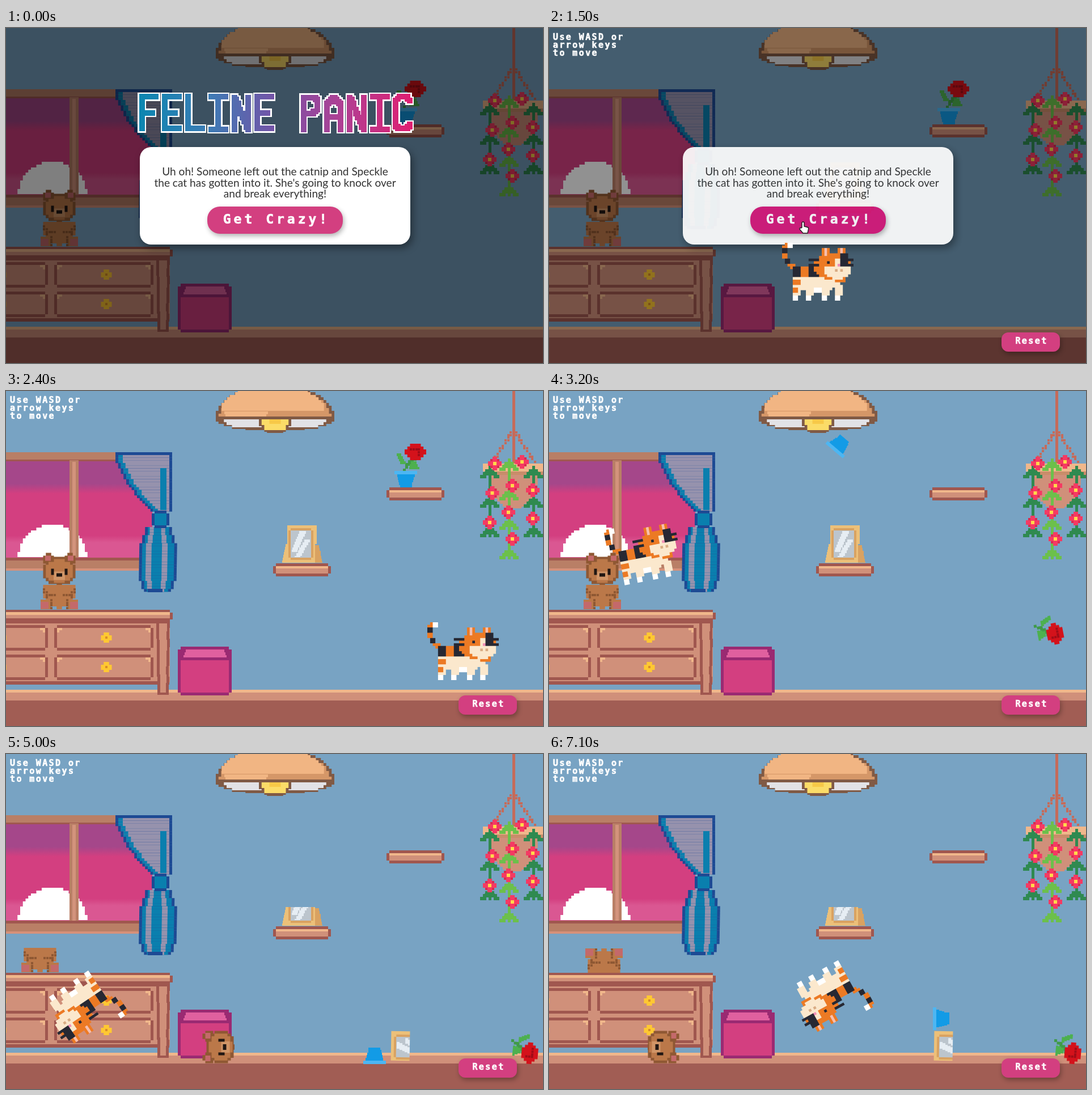
Animation, 947 px wide and 591 px high, one loop 7200 ms. Source, as an HTML page with a canvas:

```html
<!DOCTYPE html>
<html lang="en">
<head>
<meta charset="utf-8">
<title>Feline Panic</title>
<style>
html, body { margin: 0; width: 947px; height: 591px; overflow: hidden; }
body { position: relative; background: #78a3c3; }
canvas, div, svg { position: absolute; }
canvas { left: 0; top: 0; }
.pixel { font: bold 15px/14px "DejaVu Sans Mono", monospace; letter-spacing: 2.4px; color: #fff; white-space: pre; -webkit-text-stroke: .6px #fff; }
#shade { inset: 0; background: rgba(0, 0, 0, .5); }
#card { left: 236px; top: 210px; width: 477px; height: 172px; border-radius: 20px; background: #fff; box-shadow: 4px 6px 14px rgba(0, 0, 0, .4); }
#story { left: 0; right: 0; top: 33px; text-align: center; white-space: nowrap; font: 19.1px/19.5px Lato, sans-serif; color: #333; }
.button { background: #d33f80; box-shadow: 2px 4px 8px rgba(0, 0, 0, .3); text-align: center; }
#go { left: 119px; top: 105px; width: 239px; height: 48px; border-radius: 22px; font-size: 23px; line-height: 44px; letter-spacing: 5px; text-indent: 5px; }
#reset { left: 798px; top: 537px; width: 103px; height: 34px; border-radius: 12px; line-height: 31px; text-indent: 3px; }
#hint { left: 7px; top: 9px; }
</style>
</head>
<body>
<canvas id="room" width="947" height="591"></canvas>
<div id="shade"></div>
<canvas id="title" width="947" height="591" role="img" aria-label="FELINE PANIC"></canvas>
<div id="card">
  <div id="story">Uh oh! Someone left out the catnip and Speckle<br>the cat has gotten into it. She's going to knock over<br>and break everything!</div>
  <div id="go" class="button pixel">Get Crazy!</div>
</div>
<canvas id="actor" width="947" height="591"></canvas>
<div id="game">
  <div id="hint" class="pixel">Use WASD or
arrow keys
to move</div>
  <div id="reset" class="button pixel">Reset</div>
</div>
<svg id="hand" width="20" height="24"><path d="M6 11V3a2 2 0 0 1 4 0v6l6 1.5q2 .6 1.6 3L16 21H8L2 14q-.5-3 2-2z" fill="#fff" stroke="#222" stroke-width="1.4"/></svg>
<script>
const $ = id => document.getElementById(id);
const W = 947, H = 591, LOOP = 7200, CLICK = 1400, PIXEL = 4.75, GRAVITY = .0012;
const EDGE = '#a0574f', WOOD = '#d0907a', LIGHT = '#f0b78b', FRAME = '#b97f66';
const roomCtx = $('room').getContext('2d'), actorCtx = $('actor').getContext('2d');
let g;

function box(color, x, y, w, h) {
  g.fillStyle = color;
  g.fillRect(x, y, w, h);
}

// Bordered block with notched corners.
function block(edge, fill, x, y, w, h, b = 5) {
  box(edge, x + b, y, w - 2 * b, h);
  box(edge, x, y + b, w, h - 2 * b);
  box(fill, x + b, y + b, w - 2 * b, h - 2 * b);
}

// Stepped ellipse, optionally cut between two heights.
function blob(color, cx, cy, rx, ry, top = cy - ry, bottom = cy + ry, p = PIXEL) {
  for (let y = top; y < bottom - p / 4; y += p) {
    const k = (y + p / 2 - cy) / ry;
    const half = Math.round(rx * Math.sqrt(Math.max(0, 1 - k * k)) / p) * p;
    const y1 = Math.round(y), y2 = Math.round(Math.min(bottom, y + p));
    box(color, cx - half, y1, half * 2, y2 - y1);
  }
}

// Stepped trapezoid from one width to another around a sliding centre.
function taper(color, y, y2, cx, w, cx2 = cx, w2 = w) {
  for (let t = y; t < y2 - 1; t += PIXEL) {
    const u = (t + PIXEL / 2 - y) / (y2 - y);
    const half = (w + (w2 - w) * u) / 2, mid = cx + (cx2 - cx) * u;
    const y1 = Math.round(t), end = Math.round(Math.min(y2, t + PIXEL));
    box(color, Math.round(mid - half), y1, Math.round(half * 2), end - y1);
  }
}

// Squares stamped along a path, snapped to the pixel grid.
function trace(color, pts, size = 5, p = PIXEL) {
  const [x0, y0] = pts, snap = (v, v0) => Math.round(v0 + Math.round((v - v0) / p) * p - size / 2);
  for (let i = 0; i + 3 < pts.length; i += 2) {
    const [x, y, x2, y2] = pts.slice(i, i + 4), n = Math.ceil(Math.hypot(x2 - x, y2 - y) / 2);
    for (let k = 0; k <= n; k++)
      box(color, snap(x + (x2 - x) * k / n, x0), snap(y + (y2 - y) * k / n, y0), size, size);
  }
}

function sprite(x, y, w, h, draw) {
  const c = document.createElement('canvas');
  c.width = w;
  c.height = h;
  g = c.getContext('2d');
  g.translate(-x, -y);
  draw();
  return c;
}

function drawWindow() {
  const sky = g.createLinearGradient(0, 122, 0, 295);
  sky.addColorStop(.24, '#a5478a');
  sky.addColorStop(.34, '#d33f80');
  sky.addColorStop(.77, '#d33f80');
  sky.addColorStop(.84, '#da5792');
  box(sky, 0, 122, 258, 173);
  blob('#fff', 82, 293, 60, 57, 236, 293);
  box(FRAME, 0, 108, 235, 14);
  box(EDGE, 0, 121, 198, 3);
  box(FRAME, 112, 122, 16, 177);
  box('#d3937c', 117, 125, 6, 172);
  box(EDGE, 0, 294, 235, 5);
  box(FRAME, 0, 299, 235, 14);
  box('#d6917a', 0, 313, 235, 4);
}

function drawCurtain() {
  const edge = '#1d4a94', blue = '#0a7fae', grey = '#9692ad', right = 293;
  for (let y = 108; y < 212; y += PIXEL) {
    const left = 193 + Math.round(67 * ((y - 108) / 104) ** 1.7 / PIXEL) * PIXEL;
    box(edge, left, y, right - left, 5);
    box(grey, left + 5, y, right - left - 10, 5);
    box(blue, left + 5, y, 8, 5);
  }
  box(edge, 193, 108, 100, 5);
  box(blue, 272, 136, 11, 74);
  for (let y = 240; y < 350; y += PIXEL) {
    const u = (y - 240) / 114, cx = 269 - 2 * u;
    const half = Math.round(35 * Math.sin(.6 + 1.9 * u) ** .8 / PIXEL) * PIXEL;
    box(edge, cx - half, y, half * 2, 5);
    box(blue, cx - half + 5, y, half * 2 - 10, 5);
    box(grey, cx - half * .65, y, half * .3, 5);
    box(grey, cx + half * .2, y, half * .3, 5);
  }
  box(edge, 250, 349, 26, 6);
  block(edge, blue, 257, 211, 31, 31);
}

function drawDresser() {
  box(WOOD, 0, 404, 289, 110);
  box(EDGE, 0, 404, 289, 6);
  box(EDGE, 0, 512, 270, 6);
  for (const y of [413, 465]) for (const x of [-101, 85]) {
    block(EDGE, WOOD, x, y, 175, 45);
    for (const [cx, dx] of [[x + 5, 0], [x + 161, 5]]) {
      box(LIGHT, cx, y + 5, 9, 4);
      box(LIGHT, cx + dx, y + 9, 4, 4);
    }
    blob('#ffc832', x + 92, y + 22, 9, 9);
    box('#d98d2b', x + 90, y + 20, 4, 4);
  }
  taper(EDGE, 404, 536, 277, 24, 277, 20);
  taper(WOOD, 410, 532, 277, 14, 277, 10);
  box(EDGE, 0, 386, 289, 19);
  box(EDGE, 284, 391, 10, 12);
  box(LIGHT, 0, 390, 289, 5);
  box(WOOD, 0, 395, 289, 6);
}

function drawPouf() {
  const edge = '#9a2a72';
  block(edge, '#d33f80', 303, 451, 95, 86);
  box(edge, 308, 456, 85, 19);
  taper('#e0609f', 456, 471, 350.5, 66, 350.5, 78);
}

function drawShelf(x, y) {
  block(EDGE, WOOD, x, y, 102, 23);
  box(LIGHT, x + 5, y + 5, 92, 4);
}

function drawLamp() {
  const edge = '#805a45', cx = 474.5, rim = 48;
  blob(edge, cx, rim, 104, 60, -3, 54);
  blob(edge, cx, rim, 104, 25, rim, 69);
  blob('#d59768', cx, rim, 99, 55, -3, 45);
  blob('#f1b583', cx - 4, rim - 12, 92, 48, -3, 36);
  taper('#f1b583', 36, 45, cx - 50, 80, cx - 52, 70);
  blob('#e2e2e6', cx, rim + 2, 92, 20, rim + 2, 65);
  blob(edge, cx, rim, 29, 30, rim, 74);
  blob('#fbdc68', cx, rim + 2, 24, 24, rim + 2, 70);
  box('#f7c948', cx - 10, rim + 2, 20, 8);
}

function drawFlowerHead(x, y) {
  box('#d92b50', x - 8, y - 8, 16, 16);
  box('#f53a63', x - 12, y - 4, 24, 8);
  box('#f53a63', x - 4, y - 12, 8, 24);
  box('#ffd84a', x - 3, y - 3, 6, 6);
}

function drawPlant() {
  const rope = '#c56b5a';
  box(rope, 893, 0, 5, 128);
  for (const side of [-1, 1]) trace(rope, [895, 68, 895 + side * 37, 125], 4);
  blob(WOOD, 895, 147, 42, 62, 147, 207);
  box(LIGHT, 841, 128, 106, 14);
  box('#c98d6a', 846, 142, 101, 6);
  const vines = [['#2f8a50', 853, 146, 3], ['#6cc04b', 887, 133, 4], ['#2f8a50', 930, 146, 3]];
  for (const [color, x, y, leaves] of vines) {
    box(color, x - 2, y - 14, 5, leaves * 52 - 30);
    for (let i = 0; i < leaves; i++) {
      const ly = y + i * 52;
      for (const side of [-1, 1]) trace(color, [x, ly - 5, x + side * 14, ly + 5], 6);
      box(color, x - 9, ly - 4, 18, 6);
    }
  }
  for (let i = 0; i < 3; i++) {
    drawFlowerHead(862 - 4.5 * i, 128 + 52 * i);
    drawFlowerHead(i === 1 ? 886 : 893, 167 + 47 * i);
    drawFlowerHead(i ? 929 : 910, 125 + 50 * i);
  }
}

function drawMirror() {
  const gold = '#ecc079', shadow = '#d9a261', glass = '#bcc5cd', shine = '#e6edf3';
  taper(shadow, 272, 303, 546, 12, 551, 14);
  taper(gold, 237, 270, 522, 52);
  taper(gold, 270, 303, 520, 52, 516, 58);
  block(shadow, glass, 498, 242, 44, 56, 4);
  taper(shine, 247, 284, 524, 12, 508, 10);
  taper(shine, 262, 293, 532, 10, 514, 10);
}

function drawTeddy() {
  const fur = '#bb7849', dark = '#8f5833', pink = '#c4696a', black = '#211713', cx = 94;
  const both = draw => [-1, 1].forEach(draw);
  both(s => blob(dark, cx + s * 19, 296, 10, 10));
  blob(dark, cx, 318, 29, 25);
  both(s => box(pink, cx + s * 20 - 5, 291, 10, 9));
  blob(fur, cx, 318, 25, 21);
  box('#d09567', cx - 10, 319, 20, 15);
  both(s => box(black, cx + s * 12 - 2.5, 314, 5, 11));
  box(black, cx - 5, 322, 10, 6);
  blob(fur, cx, 355, 29, 28, 342, 385);
  both(s => {
    box(fur, cx + s * 24 - 9, 368, 18, 17);
    box(pink, cx + s * 26 - 7, 372, 14, 12);
    trace(dark, [cx + s * 27, 350, cx + s * 20, 362, cx + s * 8, 360], 4);
    trace(dark, [cx + s * 14, 383, cx + s * 16, 370], 4);
  });
}

function drawFlower() {
  const green = '#4db04f';
  trace('#3f9a48', [702, 139, 719, 118]);
  taper(green, 110, 129, 692, 8, 701, 10);
  taper(green, 124, 138, 719, 8, 720, 20);
  blob('#d4121b', 722, 108, 17, 15);
  trace('#a00c17', [714, 103, 726, 104, 728, 112], 4);
}

function drawPot() {
  box('#4db6f2', 685, 141, 40, 6);
  taper('#129be6', 147, 170, 705, 32, 705, 20);
}

// Drawn in cells, five canvas pixels each.
function drawCat() {
  const cream = '#fbe8cd', orange = '#ec7a24', black = '#262833', white = '#fff', pink = '#f6bfae';
  const oval = (color, x, y, rx, ry) => blob(color, x, y, rx, ry, y - ry, y + ry, 1);
  g.scale(5, 5);
  for (let i = 0; i < 11; i++)
    box(i % 4 > 1 ? black : orange, Math.round((i - 3) ** 2 / 14), i, i > 7 ? 3 : 2, 1);
  box(white, 2, 0, 2, 2);
  oval(cream, 13, 14, 9, 5);
  box(black, 4, 9, 4, 4);
  box(orange, 7, 9, 4, 4);
  box(black, 10, 9, 4, 4);
  box(orange, 4, 14, 3, 5);
  box(white, 9, 17, 6, 2);
  for (const x of [4, 9, 15, 20]) {
    box(cream, x, 16, 3, 4);
    box(white, x, 20, 2, 2);
  }
  box(orange, 4, 17, 2, 2);
  oval(orange, 19, 9, 7, 5);
  box(orange, 20, 11, 4, 4);
  for (const x of [15, 21]) {
    box(orange, x, 2, 3, 4);
    box(pink, x + 1, 2, 1, 3);
  }
  oval(cream, 21, 10, 5, 4);
  box(orange, 16, 5, 4, 4);
  box(black, 22, 4, 3, 5);
  box(black, 17, 7, 1, 1);
  box('#f08fb5', 21, 8, 1, 1);
  for (const x of [20, 22]) box('#d9ac84', x, 10, 1, 1);
  for (const y of [6, 8]) {
    box(black, 10, y, 4, 1);
    box(black, 25, y, 2, 1);
  }
}

// Lettering strokes: digit pairs are x and y on a 4 by 8 grid.
const GLYPHS = {
  F: '400008 0434', E: '40000848 0434', L: '000848', I: '0040 0848 2028', N: '08004840',
  P: '08003041433404', A: '0802204248 0545', C: '4130100107183847'
};

function drawTitle() {
  const tint = g.createLinearGradient(232, 0, 719, 0);
  ['#0a86b0', '#3b7db6', '#7653a7', '#b23f93', '#e01e70'].forEach((c, i) => tint.addColorStop(i / 4, c));
  for (const [color, size] of [['#fff', 15], [tint, 10]])
    [...'FELINE PANIC'].forEach((ch, i) => {
      for (const path of (GLYPHS[ch] || '').split(' '))
        trace(color, [...path].map((d, k) => k % 2 ? 121 + d * 7.2 : 240 + i * 40.7 + d * 6), size, 3.5);
    });
}

// Each move is: start, end, then the x, y and degrees it leads to.
const cat = { img: sprite(0, 0, 135, 110, drawCat), scale: .93, x: 474, y: 395, moves: [
  [1400, 1500, 474, 430, 0], [1500, 2400, 806, 459, 0], [2400, 2700, 740, 190, -20], [2700, 3250, 110, 310, -10],
  [3250, 3900, 419, 240, -37], [3900, 5000, 137, 449, 146], [5000, 6000, 113, 212, 80], [6000, 7100, 496, 430, 151]] };
const pieces = [
  { img: sprite(685, 90, 56, 56, drawFlower), x: 713, y: 118, moves: [[2700, 3300, 914, 518, 95]] },
  { img: sprite(683, 141, 44, 30, drawPot), x: 705, y: 156,
    moves: [[2700, 3900, 243, 512, -335], [3900, 4800, 650, 532, -180], [5300, 5800, 692, 467, -90]] },
  { img: sprite(490, 236, 62, 34, drawMirror), x: 521, y: 253, moves: [[3200, 3700, 695, 516, -89]] },
  { img: sprite(60, 342, 68, 44, drawTeddy), x: 94, y: 364, moves: [[3200, 3500, 60, 364, 0], [6200, 6700, 97, 364, 180]] },
  { img: sprite(64, 285, 60, 57, drawTeddy), x: 94, y: 313,
    moves: [[3200, 3800, 372, 514, -98], [3900, 4100, 374, 517, -90], [5000, 5800, 205, 512, 97], [6000, 6200, 202, 517, 90]] }
];

const clamp = v => Math.max(0, Math.min(1, v));

// Every move is a throw under the same gravity.
function place(ctx, { img, x, y, moves, scale = 1 }, t) {
  let deg = 0;
  for (const [from, to, x2, y2, deg2] of moves) {
    if (t <= from) break;
    const u = clamp((t - from) / (to - from));
    x += (x2 - x) * u;
    y += (y2 - y) * u - GRAVITY / 2 * (to - from) ** 2 * u * (1 - u);
    deg += (deg2 - deg) * u;
  }
  ctx.save();
  ctx.translate(x, y);
  ctx.rotate(deg * Math.PI / 180);
  ctx.scale(scale, scale);
  ctx.drawImage(img, -img.width / 2, -img.height / 2);
  ctx.restore();
}

const scene = sprite(0, 0, W, H, () => {
  box('#78a3c3', 0, 0, W, H);
  drawWindow();
  drawCurtain();
  box(LIGHT, 0, 527, W, 5);
  box(WOOD, 0, 532, W, 14);
  box('#a15d54', 0, 546, W, 45);
  drawDresser();
  drawPouf();
  drawShelf(671, 170);
  drawShelf(471, 304);
  drawLamp();
  drawPlant();
});
const mirrorBase = sprite(486, 270, 74, 34, drawMirror);
g = $('title').getContext('2d');
drawTitle();

const show = (id, on) => $(id).style.visibility = on ? 'visible' : 'hidden';

function render(t) {
  const playing = t >= CLICK, fade = clamp((t - CLICK) / 700);
  roomCtx.drawImage(scene, 0, 0);
  roomCtx.drawImage(mirrorBase, 486, 270);
  for (const piece of pieces) place(roomCtx, piece, t);
  actorCtx.clearRect(0, 0, W, H);
  if (playing) place(actorCtx, cat, t);

  $('shade').style.opacity = 1 - fade;
  $('card').style.opacity = 1 - fade ** 1.3;
  show('title', !playing);
  show('game', playing);

  const u = clamp((t - 600) / 500), ease = u * (2 - u);
  show('hand', t >= 600 && t < 1800);
  $('hand').style.left = 640 - 200 * ease + 'px';
  $('hand').style.top = 550 - 209 * ease + 'px';
  $('go').style.background = t >= 1000 ? '#d6187a' : '#d33f80';
}

let start;
function tick(now) {
  start ??= now;
  render(Math.floor((now - start) % LOOP / 100) * 100);
  requestAnimationFrame(tick);
}
render(0);
requestAnimationFrame(tick);
</script>
</body>
</html>
```
